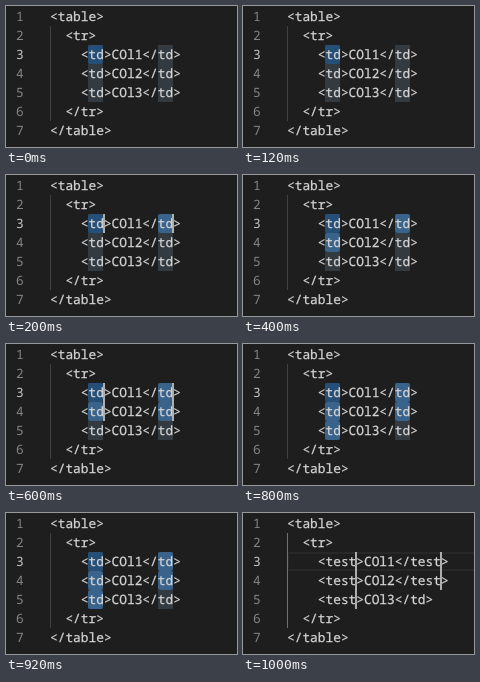
Recreate the animation shown at these times as an HTML page. Size 231 px wide and 141 px high, loop 1200 ms.

```html
<!DOCTYPE html>
<html lang="en">
<head>
<meta charset="utf-8">
<title>Multi-cursor editing</title>
<style>
html, body { margin: 0; width: 100%; height: 100%; overflow: hidden; background: #1e1e1e; }
svg { display: block; width: 231px; height: 141px; }
text {
  font: 12.83px "Noto Sans Mono", "DejaVu Sans Mono", monospace;
  fill: #d4d4d4;
  stroke: #d4d4d4;
  stroke-width: .25px;
  white-space: pre;
  text-rendering: geometricPrecision;
}
.gutter text { fill: #858585; stroke: none; }
.gutter .current { fill: #c6c6c6; }
.match { fill: #333a40; }
.pick { fill: #3a638c; }
.first { fill: #264f78; }
.caret { fill: #aeafad; }
.guide { fill: #404040; }
.after .guide { fill: #707070; }
.line { fill: none; stroke: #282828; stroke-width: 2; }

.before, .after, .blink, .s1, .s2, .s3, .s4 {
  animation: 1200ms step-end infinite;
}
.before { animation-name: before; }
.after { animation-name: after; }
.blink { animation-name: blink; }
.s1 { animation-name: s1; }
.s2 { animation-name: s2; }
.s3 { animation-name: s3; }
.s4 { animation-name: s4; }
@keyframes before { 0% { opacity: 1; } 83.3333%, 100% { opacity: 0; } }
@keyframes after { 0% { opacity: 0; } 83.3333%, 100% { opacity: 1; } }
@keyframes blink { 0%, 33.3333%, 66.6667%, 100% { opacity: 0; } 16.6667%, 50% { opacity: 1; } }
@keyframes s1 { 0% { opacity: 0; } 16.6667%, 100% { opacity: 1; } }
@keyframes s2 { 0% { opacity: 0; } 33.3333%, 100% { opacity: 1; } }
@keyframes s3 { 0% { opacity: 0; } 50%, 100% { opacity: 1; } }
@keyframes s4 { 0% { opacity: 0; } 66.6667%, 100% { opacity: 1; } }
</style>
</head>
<body>
<svg id="editor" viewBox="0 0 231 141"></svg>
<script>
const charW = 7.7, lineH = 19, left = 44;
const colX = col => left + col * charW;
const rowY = row => 1 + (row - 1) * lineH;

const text = (row, x, str, cls = "") =>
  `<text class="${cls}" x="${x}" y="${rowY(row) + 14}">${str.replace(/</g, "&lt;")}</text>`;
const code = (row, col, str) => text(row, colX(col), str);
const box = (cls, row, col, radius) =>
  `<rect class="${cls}" x="${Math.round(colX(col) - 0.1)}" y="${rowY(row)}" width="15" height="${lineH}" rx="${radius}"/>`;
const match = (row, col) => box("match", row, col, 0);
const pick = (cls, row, col) => box(cls, row, col, 3);
const caret = (row, col) =>
  `<rect class="caret" x="${Math.round(colX(col) - 1)}" y="${rowY(row)}" width="2" height="${lineH}"/>`;
const guide = (col, from, to) =>
  `<rect class="guide" x="${Math.floor(colX(col))}" y="${rowY(from)}" width="1" height="${(to - from + 1) * lineH}"/>`;
const group = (cls, ...parts) => `<g class="${cls}">${parts.flat().join("")}</g>`;

const cells = [3, 4, 5];
const openCol = 5, closeCol = 14;
const numbers = [1, 2, 3, 4, 5, 6, 7].map(n => text(n, 10, String(n), n === 3 ? "current" : ""));

document.getElementById("editor").innerHTML = [
  group("gutter", numbers),
  guide(0, 2, 6),
  group("before",
    cells.map(r => match(r, openCol) + match(r, closeCol)),
    pick("first", 3, openCol),
    pick("pick s1", 3, closeCol),
    pick("pick s2", 4, openCol),
    pick("pick s3", 4, closeCol),
    pick("pick s4", 5, openCol),
    cells.map(r => code(r, 4, `<td>COl${r - 2}</td>`)),
    group("blink", caret(3, 7), caret(3, 16), group("s3", caret(4, 7), caret(4, 16)))),
  group("after",
    `<rect class="line" x="45" y="${rowY(3) + 1}" width="200" height="${lineH - 2}"/>`,
    guide(0, 2, 6),
    cells.map(r => code(r, 4, `<test>COl${r - 2}</${r < 5 ? "test" : "td"}>`)),
    cells.map(r => caret(r, 9)),
    caret(3, 20), caret(4, 20)),
  code(1, 0, "<table>"),
  code(2, 2, "<tr>"),
  code(6, 2, "</tr>"),
  code(7, 0, "</table>")
].join("");
</script>
</body>
</html>
```
